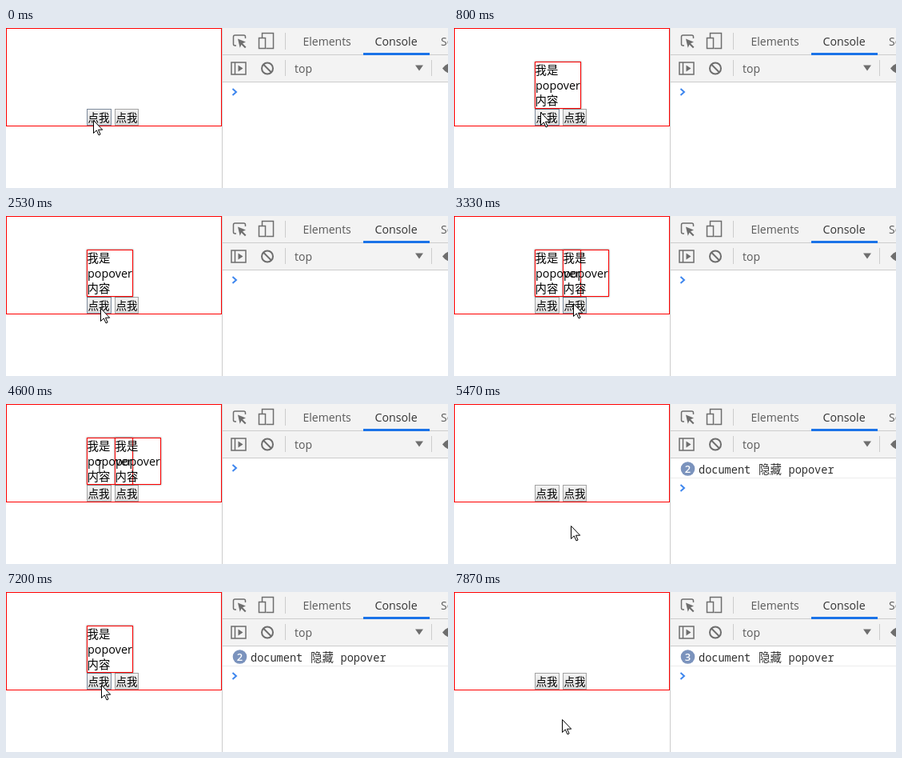
An HTML page for the animation above (8000 ms loop, 553 by 200 pixels).

```html
<!DOCTYPE html>
<html lang="zh">
<head>
<meta charset="utf-8">
<title>Popover</title>
<style>
html, body { margin: 0; height: 100%; overflow: hidden; background: #fff; }
svg { display: block; }
text { font-family: "Open Sans", "Noto Sans CJK SC", "Noto Sans CJK", sans-serif; white-space: pre; }
.pop text { font-size: 14.4px; }
.pop rect { fill: none; stroke: red; }
.btn text { font-size: 13.5px; }
.btn rect { fill: url(#face); stroke: #a3a3a3; }
.btn.hover rect { stroke: #7c8a9c; }
.btn.down rect { fill: #d3dde6; stroke: #5c6f8a; }
.tool text { font-size: 14px; fill: #5a5a5a; }
.tool .on { font-size: 14.2px; fill: #333; }
.icon { fill: none; stroke: #6e6e6e; stroke-width: 1.5; }
.icon .solid { fill: #6e6e6e; stroke: none; }
.log text { font: 13.6px "Noto Sans Mono", "Noto Sans CJK SC", "Noto Sans CJK", monospace; fill: #303030; }
.log .cjk { font-size: 14.4px; }
.log #count { font: 600 13px "Open Sans", sans-serif; fill: #fff; text-anchor: middle; }
</style>
</head>
<body>
<svg width="553" height="200" viewBox="0 0 553 200">
  <defs>
    <linearGradient id="face" x2="0" y2="1">
      <stop stop-color="#f3f3f3"/><stop offset="1" stop-color="#dcdcdc"/>
    </linearGradient>
    <filter id="blur" x="-20%" y="-20%" width="140%" height="140%"><feGaussianBlur stdDeviation="1.3"/></filter>
    <clipPath id="outside"><path clip-rule="evenodd" d="M-5-5h68v69h-68zM0 0h58v59H0z"/></clipPath>
    <g id="pop" class="pop">
      <g clip-path="url(#outside)"><path d="M0 0h58v59H0z" fill-opacity=".5" filter="url(#blur)"/></g>
      <rect x=".5" y=".5" width="57" height="58"/>
      <text x=".5" y="15.500">我是</text>
      <text x="1" y="35">popover</text>
      <text x=".5" y="53.500">内容</text>
    </g>
  </defs>

  <rect x=".5" y=".5" width="269" height="122" fill="none" stroke="red"/>
  <g class="btn"><rect x="101.5" y="101.5" width="30" height="20"/><text x="102.500" y="117">点我</text></g>
  <g class="btn"><rect x="136.5" y="101.5" width="29" height="20"/><text x="137.500" y="117">点我</text></g>
  <use id="pop1" href="#pop" x="101" y="42"/>
  <use id="pop2" href="#pop" x="136" y="42"/>

  <g class="tool">
    <path d="M270 0h283v67H270z" fill="#f3f3f3"/>
    <path d="M270 33.5h283M270 67.5h283M349.5 6v21M349.5 40v20M532.5 40v20" stroke="#ccc"/>
    <path d="M447 31h83v3h-83z" fill="#1a73e8"/>
    <text x="371.500" y="22">Elements</text>
    <text class="on" x="461.500" y="22">Console</text>
    <text x="544" y="22">Sources</text>
    <text x="361" y="56">top</text>
    <path d="M512 46.500h10l-5 7z" fill="#6e6e6e"/>
    <g class="icon">
      <path d="M288 22h-1.500q-2 0-2-2v-9q0-2 2-2h11q2 0 2 2v2"/>
      <path class="solid" d="M290 13.500l10 4-4 1.800 4.500 4.500-1.500 1.500-4.500-4.500-1.800 4z"/>
      <path d="M320.500 12V6.500h14v19h-9M316.500 12.500h8v13h-8z"/>
      <path d="M282 43h18v15h-18zM286.500 43v15"/>
      <path class="solid" d="M290.500 46.500l6 4-6 4z"/>
      <circle cx="327" cy="50.500" r="7" stroke-width="2"/>
      <path d="M322 45.500l10 10" stroke-width="2"/>
      <path class="solid" d="M546 50.500q9-12 18 0-9 12-18 0z"/>
    </g>
  </g>
  <path d="M270.500 0v200" stroke="#ccc"/>
  <g id="log" class="log">
    <path d="M271 92.500h282" stroke="#ececec"/>
    <circle cx="292.500" cy="81" r="8.800" fill="#7b93bd"/>
    <text id="count" x="292.500" y="85.500"></text>
    <text x="306" y="87">document</text>
    <text class="cjk" x="381" y="86.500">隐藏</text>
    <text x="418.500" y="87">popover</text>
  </g>
  <path id="prompt" d="M283.500 76l4.500 4-4.500 4" fill="none" stroke="#3f87ee" stroke-width="2"/>

  <g id="cursor">
    <path id="arrow" d="M.5.5v16l3.800-3.600 2.700 6 2.100-.9-2.600-5.800h5.200z" fill="#fff" stroke="#000"/>
    <path id="beam" d="M-3-7.500h2.500l.5.500.5-.5H3M0-7V7M-3 7.500h2.500L0 7l.5.500H3" fill="none" stroke="#000"/>
    <g id="busy" fill="none">
      <circle cx="14" r="8" fill="#1e90dc"/>
      <circle cx="14" r="4" stroke="#d9f0ff" stroke-width="1.800" stroke-dasharray="16 9.100"/>
    </g>
  </g>
</svg>
<script>
const LOOP = 8000;
const $ = id => document.getElementById(id);
const btns = document.querySelectorAll('.btn');

// Pointer moves: start, end, then the x, y it comes to rest at
const moves = [
  [0, 133, 108, 105], [800, 1333, 118, 131], [1667, 2000, 118, 115],
  [2533, 3067, 149, 109], [3400, 4067, 119, 85], [4067, 4400, 116, 76],
  [4533, 5267, 146, 152], [5733, 6133, 122, 115], [6267, 6467, 116, 108],
  [7067, 7600, 135, 159]
];

function pointer(t) {
  let x = 109, y = 115;
  for (const [from, to, endX, endY] of moves) {
    const k = Math.min(1, Math.max(0, (t - from) / (to - from)));
    const e = k * k * (3 - 2 * k);
    x += (endX - x) * e;
    y += (endY - y) * e;
  }
  return [Math.round(x), Math.round(y)];
}

const show = (id, on) => $(id).setAttribute('visibility', on ? 'visible' : 'hidden');

function draw(ms) {
  const t = ms % LOOP;
  const within = (a, b) => t >= a && t < b;
  const [x, y] = pointer(t);
  const open1 = within(795, 5465) || within(6860, 7865);
  const open2 = within(3262, 5465);
  const logged = t >= 5465;
  const down = [within(530, 795) || within(6662, 6860), within(3195, 3262)];
  const overText = open1 && y > 42 && y < 100 && x > 101 && x < (open2 ? 194 : 159);

  show('pop1', open1);
  show('pop2', open2);
  btns.forEach((b, i) => {
    const dx = x - 101 - 35 * i;
    b.classList.toggle('hover', y > 100 && y < 122 && dx >= 0 && dx < 31);
    b.classList.toggle('down', down[i]);
  });

  show('log', logged);
  $('count').textContent = t >= 7865 ? 3 : 2;
  $('prompt').setAttribute('transform', `translate(0 ${logged ? 25 : 0})`);

  $('cursor').setAttribute('transform', `translate(${x} ${y})`);
  show('arrow', !overText);
  show('beam', overText);
  show('busy', within(6330, 6730));
  $('busy').setAttribute('transform', `rotate(${t / 2} 14 0)`);
}

let start;
function frame(now) {
  start ??= now;
  draw(now - start);
  requestAnimationFrame(frame);
}
draw(0);
requestAnimationFrame(frame);
</script>
</body>
</html>
```
